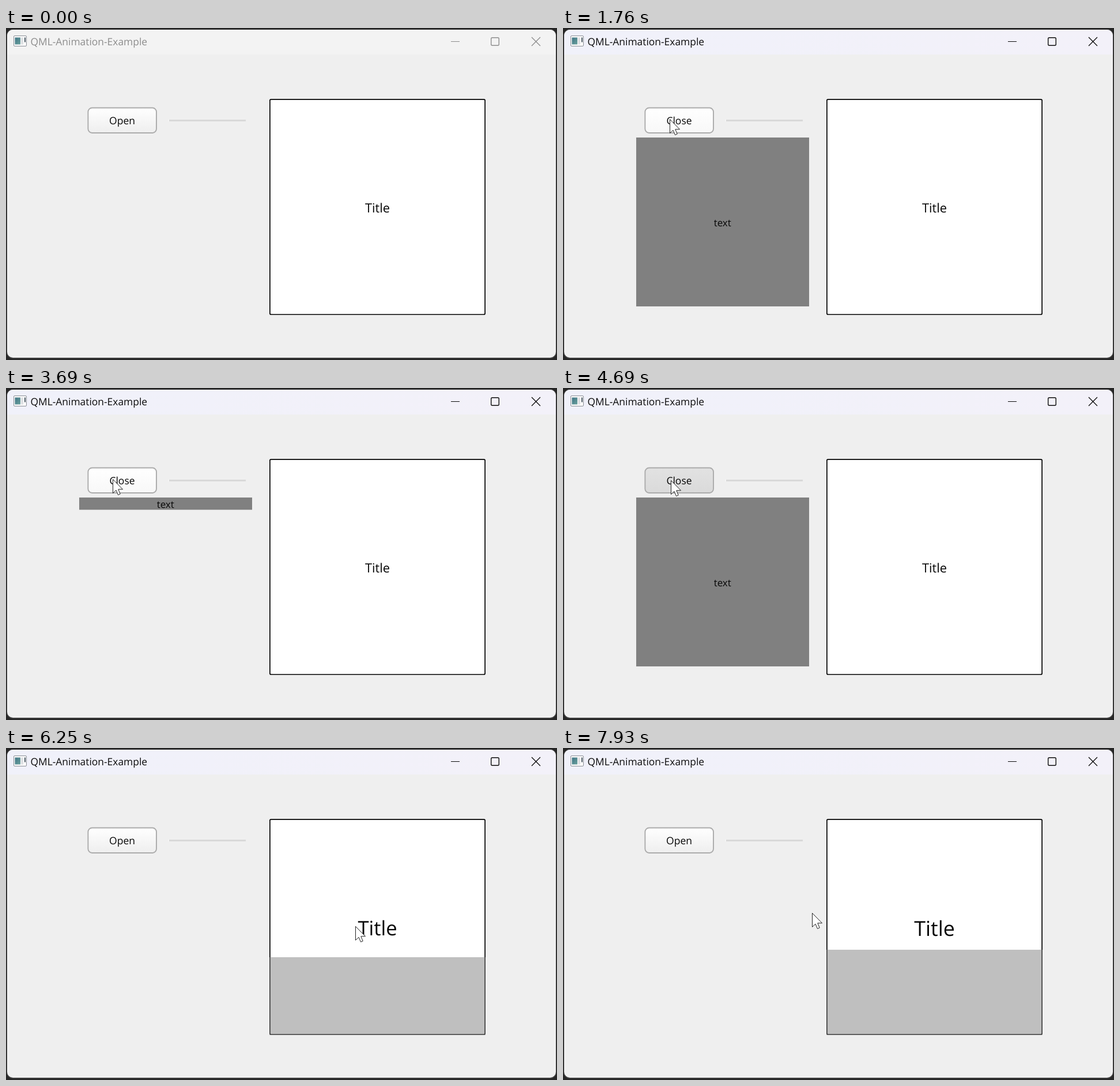
Write an HTML page that moves like this. It is 956 px wide and 576 px high and loops after 8000 ms.

```html
<!DOCTYPE html>
<html lang="en">
<head>
<meta charset="utf-8">
<title>QML-Animation-Example</title>
<style>
html, body { margin: 0; width: 100%; height: 100%; overflow: hidden; background: #262626; }
svg { display: block; width: 956px; height: 576px; }
text { font-family: "Open Sans", "Noto Sans", sans-serif; fill: #060606; text-rendering: geometricPrecision; }
.mid { text-anchor: middle; }
#bar { --ink: #8d8d8d; }
#bar.active { --ink: #0c0c0c; }
#bar text { fill: var(--ink); }
#bar .glyph { fill: none; stroke: var(--ink); stroke-width: 1.4; }
#bar .thin { stroke-width: 1; }
</style>
</head>
<body>
<svg viewBox="0 0 956 576">
  <defs>
    <linearGradient id="face" x2="0" y2="1"><stop/><stop offset="1"/></linearGradient>
    <linearGradient id="lavender"><stop stop-color="#f0f1fa"/><stop offset="1" stop-color="#f3f1f9"/></linearGradient>
    <linearGradient id="teal" x2="1" y2="1"><stop stop-color="#3f7585"/><stop offset="1" stop-color="#69a09d"/></linearGradient>
    <clipPath id="frame"><rect x="2" y="3" width="952" height="569" rx="10"/></clipPath>
    <clipPath id="panelClip"><rect id="panelWindow" x="127" y="190" width="300"/></clipPath>
  </defs>

  <rect width="956" height="576" fill="#262626"/>
  <rect x="1" y="2" width="954" height="571.5" rx="11" fill="#444"/>
  <g clip-path="url(#frame)">
    <rect width="956" height="576" fill="#efefef"/>
    <rect id="barFill" width="956" height="46"/>
  </g>

  <g id="bar">
    <rect x="13.5" y="13.5" width="22" height="18" rx="1.5" fill="#fafafa" stroke="#8c9198"/>
    <rect x="15.5" y="16.5" width="9.5" height="12" fill="url(#teal)"/>
    <rect x="26" y="16.5" width="4" height="12" fill="#dde0e3"/>
    <rect x="32" y="16.5" width="2" height="8" fill="#4d5b66"/>
    <text x="42.5" y="30" font-size="17.4">QML-Animation-Example</text>
    <path class="glyph thin" d="M772 23.5H787"/>
    <path class="glyph" d="M912 16L927 31M927 16L912 31"/>
    <rect class="glyph" x="841.7" y="16.7" width="13.6" height="13.6" rx="2"/>
  </g>

  <rect x="281" y="159" width="135" height="3" fill="#d9d9d9"/>
  <rect x="281" y="158.5" width="2" height="4" fill="#f4f4f4"/>

  <rect x="142.4" y="138.5" width="118.6" height="43.5" rx="7" fill="url(#face)" stroke="#ababab" stroke-width="1.9"/>
  <text id="label" class="mid" x="201.5" y="167.1" font-size="17.5"></text>

  <g clip-path="url(#panelClip)">
    <rect x="127" y="190" width="300" height="293" fill="#808080"/>
    <text id="panelText" class="mid" x="276.7" font-size="17">text</text>
  </g>

  <rect x="457.9" y="123.9" width="373.2" height="373.1" rx="2" fill="#fff" stroke="#000" stroke-width="1.7"/>
  <text id="title" class="mid" x="644.5">Title</text>
  <rect id="drawer" x="457" width="375" fill="#808080" opacity=".5"/>

  <path id="cursor" d="M.5 .5V24.5L6 19.3L9.5 27.5L13.2 25.9L9.8 17.8H17.5Z" fill="#fff" stroke="#222"/>
</svg>
<script>
const LOOP = 8000, STEP = 67.14, PRESS = 80;
const $ = id => document.getElementById(id);
const set = (id, attrs) => Object.entries(attrs).forEach(([k, v]) => $(id).setAttribute(k, v));
const clamp = v => Math.min(1, Math.max(0, v));

const clicks = [1440, 2490, 3671, 4778];
const crossings = [5794, 6833, 7412, 7915]; // pointer enters and leaves the box in turn
const pointerStart = { x: 938, y: 490 };
const moves = [
  { from: 670, to: 1405, x: 185, y: 158 },
  { from: 4690, to: 4698, x: 187, y: 160 },
  { from: 5430, to: 6170, x: 606, y: 309 },
  { from: 6640, to: 7050, x: 357, y: 295 },
  { from: 7090, to: 7580, x: 520, y: 300 },
  { from: 7700, to: 7920, x: 432, y: 286 }
];

// Linear run towards 1 and 0 in turn, reversing at each toggle
function toggled(t, times, duration) {
  return times.reduce((value, start, i) => {
    const end = Math.min(t, times[i + 1] ?? LOOP);
    const change = Math.max(0, end - start) / duration;
    return clamp(value + (i % 2 ? -change : change));
  }, 0);
}

function pointer(t) {
  return moves.reduce((p, m) => {
    const k = Math.sin(clamp((t - m.from) / (m.to - m.from)) * Math.PI / 2);
    return { x: p.x + (m.x - p.x) * k, y: p.y + (m.y - p.y) * k };
  }, pointerStart);
}

function drawButton(t, { x, y }) {
  const hover = x > 142 && x < 262 && y > 138 && y < 182;
  const pressed = clicks.some(c => t >= c - PRESS && t < c);
  const [top, bottom] = $('face').children;
  top.setAttribute('stop-color', pressed ? '#e2e2e2' : '#fff');
  bottom.setAttribute('stop-color', pressed ? '#dadada' : hover ? '#f8f8f8' : '#eee');
  $('label').textContent = clicks.filter(c => t >= c).length % 2 ? 'Close' : 'Open';
}

function draw(time) {
  const t = Math.floor((time % LOOP + 12) / STEP) * STEP;

  const p = pointer(t);
  set('cursor', { transform: `translate(${p.x} ${p.y})`, visibility: t < moves[0].from ? 'hidden' : 'visible' });
  drawButton(t, p);

  set('barFill', { fill: t >= clicks[0] - PRESS ? 'url(#lavender)' : '#f3f3f3' });
  $('bar').classList.toggle('active', t >= clicks[0]);

  const panel = 293 * toggled(t, clicks, 300);
  set('panelWindow', { height: panel });
  set('panelText', { y: 190 + panel / 2 + 7.7 });

  const open = toggled(t, crossings, 500);
  const drawer = Math.round(150 * open);
  set('drawer', { y: 498 - drawer, height: drawer });
  const size = 21.8 + 14.2 * open;
  set('title', { 'font-size': size, y: 310.5 + 0.42 * size });
}

const start = performance.now();
function tick() {
  draw(performance.now() - start);
  requestAnimationFrame(tick);
}
tick();
</script>
</body>
</html>
```
